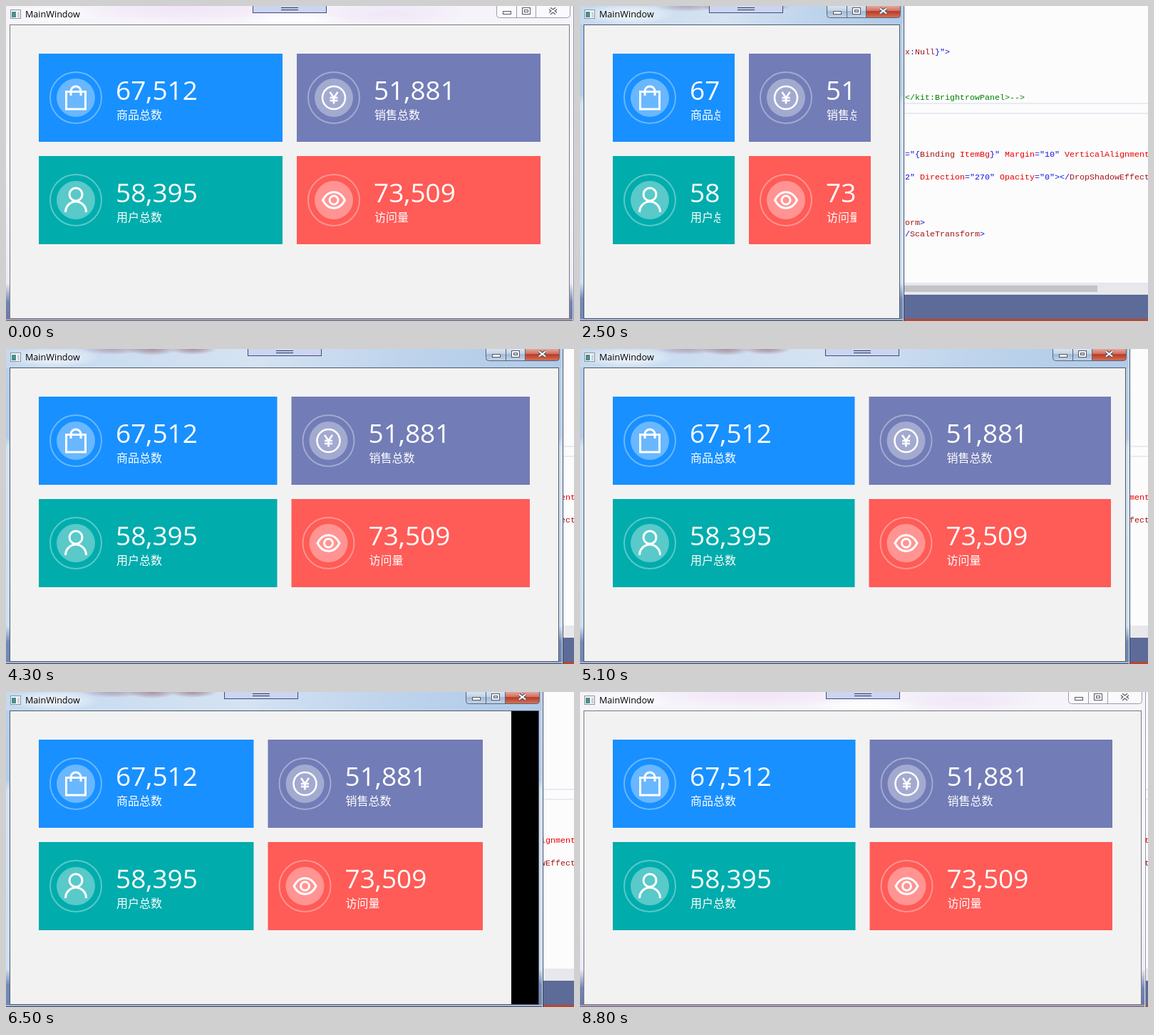
An HTML page with a canvas that plays this animation: 797x443 px, repeating every 9 s.

```html
<!DOCTYPE html>
<html lang="zh">
<head>
<meta charset="utf-8">
<style>
html, body { margin: 0; width: 100%; height: 100%; overflow: hidden; background: #fcfcfd; }
canvas { display: block; width: 797px; height: 443px; }
</style>
</head>
<body>
<canvas id="stage" width="797" height="443"></canvas>
<script>
const W = 797, H = 443, LOOP = 9000, STEP = 100;
const ctx = document.getElementById('stage').getContext('2d');
const SANS = '"Open Sans", "Noto Sans", sans-serif';
const CJK = '"Noto Sans CJK SC", "Noto Sans CJK", sans-serif';
const MONO = '"Liberation Mono", monospace';

// Right edge of the client area over time: [ms, x]
const KEYS = [
  [1000, 790], [1100, 786], [1200, 772], [1400, 736], [1500, 720], [1600, 688],
  [2000, 541], [2300, 481], [2400, 460], [2500, 448], [2600, 448], [2800, 466],
  [3000, 502], [3700, 693], [4000, 757], [4200, 775], [4300, 775], [4500, 784],
  [4700, 790], [4900, 790], [5000, 785], [5100, 765], [5400, 599], [5500, 577],
  [5600, 559], [5700, 559], [5900, 573], [6300, 672], [6400, 709], [6500, 747],
  [6600, 764], [6900, 782], [7200, 790], [7400, 790], [7700, 787], [9000, 787]
];

function edgeAt(t) {
  if (t <= KEYS[0][0]) return KEYS[0][1];
  const i = KEYS.findIndex(k => k[0] >= t);
  const [t0, x0] = KEYS[i - 1], [t1, x1] = KEYS[i];
  return Math.round(x0 + (x1 - x0) * (t - t0) / (t1 - t0));
}

function rect(x, y, w, h, fill) {
  ctx.fillStyle = fill;
  ctx.fillRect(x, y, w, h);
}

function frame(x, y, w, h, color) {
  ctx.strokeStyle = color;
  ctx.lineWidth = 1;
  ctx.strokeRect(x + .5, y + .5, w - 1, h - 1);
}

function text(str, x, y, font, fill) {
  ctx.font = font;
  ctx.fillStyle = fill;
  ctx.fillText(str, x, y);
}

function vertical(y0, y1, stops) {
  const g = ctx.createLinearGradient(0, y0, 0, y1);
  stops.forEach(([p, c]) => g.addColorStop(p, c));
  return g;
}

function glow(x, y, rx, ry, rgb, alpha) {
  ctx.save();
  ctx.translate(x, y);
  ctx.scale(rx, ry);
  const g = ctx.createRadialGradient(0, 0, 0, 0, 0, 1);
  g.addColorStop(0, `rgba(${rgb},${alpha})`);
  g.addColorStop(.5, `rgba(${rgb},${alpha * .6})`);
  g.addColorStop(1, `rgba(${rgb},0)`);
  rect(-1, -1, 2, 2, g);
  ctx.restore();
}

// Editor behind the window; each token is [colour, text]
const RED = '#e60000', BLUE = '#1010e0', BROWN = '#a31515', GREEN = '#008000';
const CODE = [
  [64, [BROWN, 'x'], [BLUE, ':'], [BROWN, 'Null'], [BLUE, '}">']],
  [128, [GREEN, '</kit:BrightrowPanel>-->']],
  [208, [BLUE, '="{'], [BROWN, 'Binding'], [RED, ' ItemBg'], [BLUE, '}"'],
    [RED, ' Margin'], [BLUE, '="10"'], [RED, ' VerticalAlignment']],
  [240, [BLUE, '2"'], [RED, ' Direction'], [BLUE, '="270"'], [RED, ' Opacity'],
    [BLUE, '="0"></'], [BROWN, 'DropShadowEffect']],
  [304, [BROWN, 'orm'], [BLUE, '>']],
  [320, [BLUE, '/'], [BROWN, 'ScaleTransform'], [BLUE, '>']]
];

function drawEditor() {
  rect(0, 0, W, H, '#fcfcfd');
  rect(0, 136, W, 2, '#e8eaf3');
  rect(0, 150, W, 2, '#e8eaf3');
  for (const [y, ...tokens] of CODE) {
    let x = 456;
    for (const [color, str] of tokens) {
      text(str, x, y + 4, `11.667px ${MONO}`, color);
      x += str.length * 7;
    }
  }
  rect(0, 389, W, 17, '#e8e8ec');
  rect(0, 393, 726, 9, '#c2c3c9');
  rect(0, 406, W, 34, '#5d6b99');
  rect(0, 440, W, 3, '#b5482f');
}

function drawGlass(edge, active) {
  const out = edge + 7;
  ctx.save();
  ctx.beginPath();
  ctx.rect(0, 0, out, H);
  ctx.clip();
  if (active) {
    rect(0, 0, out, H, vertical(0, H, [
      [0, '#b9d0ea'], [.28, '#b4cde9'], [.31, '#d3e3f4'], [.88, '#cfe0f3'],
      [.93, '#7389b8'], [1, '#7186b4']]));
    const g = ctx.createLinearGradient(0, 0, out, 0);
    g.addColorStop(0, 'rgba(225,238,250,.3)');
    g.addColorStop(.45, 'rgba(225,235,246,.7)');
    g.addColorStop(1, 'rgba(165,195,230,.4)');
    rect(0, 0, out, 26, g);
    glow(150, 0, 45, 8, '130,80,100', .4);
    glow(205, 0, 35, 9, '130,65,75', .5);
    glow(262, 0, 34, 8, '130,65,75', .5);
  } else {
    rect(0, 0, out, H, vertical(0, H, [
      [0, '#f6f3fa'], [.5, '#fbf9fd'], [.88, '#eeeaf6'], [.94, '#7484b2'], [1, '#6878a8']]));
    glow(250, 4, 150, 20, '240,226,246', .8);
    glow(540, 10, 110, 20, '238,228,246', .8);
    glow(400, 20, 80, 12, '255,255,255', .9);
  }
  glow(66, 12, 66, 15, '255,255,255', .75);
  rect(0, 440, out, 3, active ? '#a7b6d0' : '#a99bb2');
  rect(0, 442, out, 1, active ? '#3b4660' : '#75667f');
  rect(out - 2, 0, 1, H, 'rgba(255,255,255,.7)');
  rect(out - 1, 0, 1, H, active ? '#39465c' : '#8f93a5');
  ctx.restore();
}

function drawTitle() {
  rect(6, 5, 15, 13, '#f7f9fb');
  frame(6, 5, 15, 13, '#8a939c');
  rect(8, 8, 6, 8, '#4b8f8b');
  rect(16, 8, 3, 8, '#c9d2d8');
  text('MainWindow', 27, 16, `12.6px ${SANS}`, '#000');
}

function drawButtons(edge, active) {
  const x = edge - 102, line = active ? '#56657c' : '#9a9ea8';
  ctx.save();
  ctx.beginPath();
  ctx.roundRect(x + .5, -6, 103, 22.5, 4);
  ctx.save();
  ctx.clip();
  rect(x, 0, 104, 17, active
    ? vertical(0, 17, [[0, '#d8e4f1'], [.4, '#c3d3e6'], [.45, '#a3b8d2'], [1, '#c5d8ec']])
    : 'rgba(255,255,255,.5)');
  if (active) {
    rect(edge - 47, 0, 49, 17,
      vertical(0, 17, [[0, '#e3a79c'], [.4, '#d2705f'], [.45, '#b93a25'], [1, '#d8775a']]));
  }
  ctx.restore();
  ctx.strokeStyle = line;
  ctx.lineWidth = 1;
  ctx.stroke();
  ctx.restore();
  rect(edge - 74, 0, 1, 16, line);
  rect(edge - 47, 0, 1, 16, line);

  const dark = '#535666';
  rect(edge - 93, 7, 12, 5, dark);
  rect(edge - 92, 8, 10, 3, '#fff');
  rect(edge - 66, 2, 12, 10, dark);
  rect(edge - 65, 3, 10, 8, '#fff');
  rect(edge - 63, 5, 6, 4, dark);
  rect(edge - 62, 6, 4, 2, active ? '#c3d3e6' : '#fff');
  for (const [width, color] of [[4.4, dark], [2.2, '#fff']]) {
    ctx.strokeStyle = color;
    ctx.lineWidth = width;
    ctx.beginPath();
    ctx.moveTo(edge - 27, 3.5);
    ctx.lineTo(edge - 18, 10.5);
    ctx.moveTo(edge - 18, 3.5);
    ctx.lineTo(edge - 27, 10.5);
    ctx.stroke();
  }
}

function drawTab(edge) {
  const x = Math.round((edge + 6) / 2) - 52;
  rect(x, -1, 104, 11, '#ccd5f0');
  frame(x, -1, 104, 11, '#3f4c7c');
  rect(x + 40, 2, 24, 1, '#26335f');
  rect(x + 40, 5, 24, 1, '#26335f');
}

// Icons are drawn around the centre of their ring
const ICONS = {
  bag: 'M-13.5-8.5h27v24.5h-27zM-7-3v-6a7 7 0 0 1 14 0v6',
  yen: 'M-16 0a16 16 0 1 0 32 0a16 16 0 1 0-32 0M-5.5-8L0 0L5.5-8M0 0V8.5M-5.5 0H5.5M-5.5 4H5.5',
  user: 'M-9-8a9 9 0 1 0 18 0a9 9 0 1 0-18 0M-14.5 17a14.5 15 0 0 1 29 0',
  eye: 'M-15.5 0C-8-15 8-15 15.5 0C8 15-8 15-15.5 0zM-6 0a6 6 0 1 0 12 0a6 6 0 1 0-12 0'
};
const CARDS = [
  ['#1890ff', 'bag', '67,512', '商品总数'],
  ['#727cb6', 'yen', '51,881', '销售总数'],
  ['#00acac', 'user', '58,395', '用户总数'],
  ['#ff5b57', 'eye', '73,509', '访问量']
];

function drawCard([color, icon, value, label], x, y, w) {
  ctx.save();
  ctx.translate(x, y);
  rect(0, 0, w, 124, color);

  ctx.save();
  ctx.translate(52, 62);
  ctx.beginPath();
  ctx.arc(0, 0, 36, 0, Math.PI * 2);
  ctx.strokeStyle = 'rgba(255,255,255,.35)';
  ctx.lineWidth = 2;
  ctx.stroke();
  ctx.beginPath();
  ctx.arc(0, 0, 27, 0, Math.PI * 2);
  ctx.fillStyle = 'rgba(255,255,255,.35)';
  ctx.fill();
  ctx.strokeStyle = '#fff';
  ctx.lineWidth = icon === 'yen' ? 2.6 : 3;
  ctx.stroke(new Path2D(ICONS[icon]));
  ctx.restore();

  ctx.beginPath();
  ctx.rect(0, 0, w - 20, 124);
  ctx.clip();
  text(value, 108, 65, `37px ${SANS}`, '#fff');
  text(label, 109, 92, `16px ${CJK}`, '#fff');
  ctx.restore();
}

function drawClient(edge, layout) {
  ctx.save();
  ctx.beginPath();
  ctx.rect(6, 27, edge - 6, 412);
  ctx.clip();
  rect(6, 27, edge, 412, '#000');
  rect(6, 27, layout - 6, 412, '#f2f2f2');
  const w = (layout - 106) / 2;
  CARDS.forEach((card, i) => drawCard(card, 46 + (i % 2) * (w + 20), 67 + (i >> 1) * 144, w));
  ctx.restore();
}

function draw(ms) {
  const t = Math.floor(ms / STEP) * STEP;
  const edge = edgeAt(t), prev = edgeAt(t - STEP);
  // The content lags one step behind while the border moves fast
  const layout = Math.abs(edge - prev) > 18 ? prev : edge;
  const active = t >= 1100 && t < 8800;

  drawEditor();
  drawGlass(edge, active);
  drawTitle();
  drawButtons(edge, active);
  drawClient(edge, layout);
  frame(5, 26, edge - 4, 414, active ? '#4d5867' : '#77797f');
  drawTab(prev);
}

const start = performance.now();
function tick() {
  draw((performance.now() - start) % LOOP);
  requestAnimationFrame(tick);
}
tick();
</script>
</body>
</html>
```
